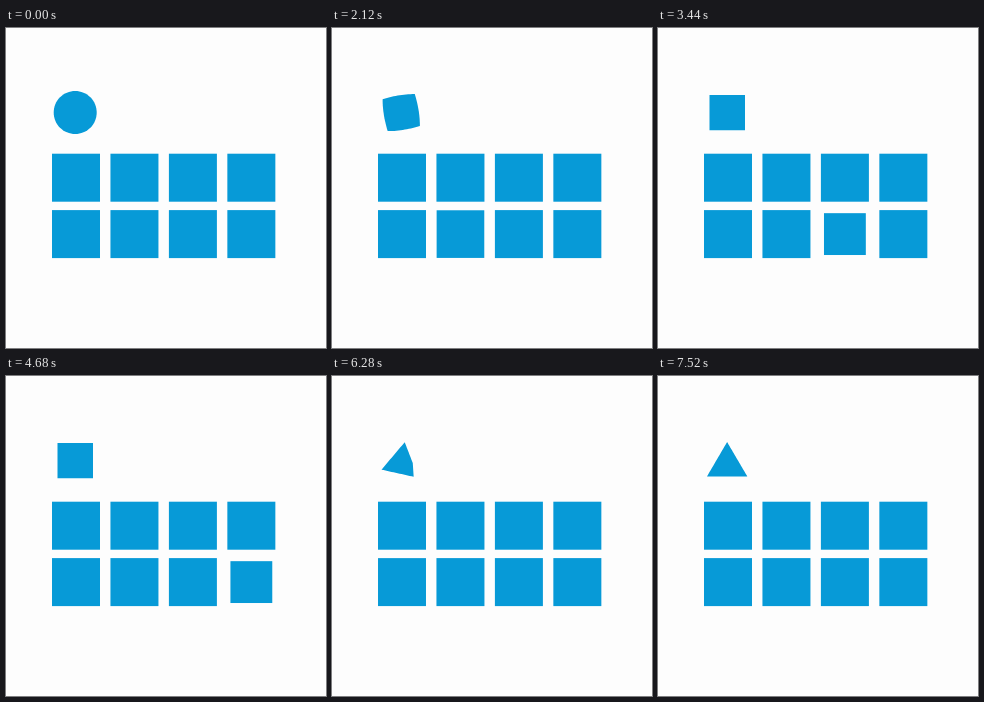
Recreate the animation shown at these times as an HTML page with a canvas. Size 320x320 px, loop 8000 ms.

```html
<!DOCTYPE html>
<html lang="en">
<head>
<meta charset="utf-8">
<title>Shape and tiles</title>
<style>
html, body { margin: 0; width: 100%; height: 100%; overflow: hidden; background: #fdfdfd; }
canvas { display: block; width: 100vmin; height: 100vmin; }
</style>
</head>
<body>
<canvas id="stage"></canvas>
<script>
const SIZE = 320, LOOP = 8000, STEP = 40;
const BLUE = '#079ad7', PAPER = '#fdfdfd';
const TILE = 48, PITCH_X = 58.45, PITCH_Y = 56.4, LEFT = 46, TOP = 125.7;
const PULSE = 600, MORPH = 2500, DIP = 0.145;
const SIDE_STEPS = 16;

// Tile presses: [start, column, row]
const presses = [
  [900, 0, 0], [2100, 1, 1], [3260, 2, 1],
  [4500, 3, 1], [5710, 0, 1], [6930, 1, 0]
];

const canvas = document.getElementById('stage');
const ctx = canvas.getContext('2d');

const clamp = v => Math.min(1, Math.max(0, v));
const mix = (a, b, t) => a + (b - a) * t;

// cubic-bezier(.25, .1, .25, 1)
function ease(x) {
  if (x <= 0 || x >= 1) return clamp(x);
  let lo = 0, hi = 1, s;
  for (let i = 0; i < 24; i++) {
    s = (lo + hi) / 2;
    if (0.75 * s * (1 - s) + s * s * s < x) lo = s; else hi = s;
  }
  const r = 1 - s;
  return 0.3 * r * r * s + 3 * r * s * s + s * s * s;
}

// Outlines share one point order so they can be blended point by point.
function polygon(corners) {
  const points = [];
  corners.forEach((a, i) => {
    const b = corners[(i + 1) % corners.length];
    for (let k = 0; k < SIDE_STEPS; k++) {
      points.push([mix(a[0], b[0], k / SIDE_STEPS), mix(a[1], b[1], k / SIDE_STEPS)]);
    }
  });
  return points;
}

function ring(cx, cy, r) {
  const count = SIDE_STEPS * 4;
  return Array.from({ length: count }, (_, i) => {
    const a = Math.PI + i / count * 2 * Math.PI;
    return [cx + r * Math.cos(a), cy + r * Math.sin(a)];
  });
}

const circle = ring(69.2, 84.5, 21.5);
const square = polygon([[51.5, 67], [87, 67], [87, 102.2], [51.5, 102.2]]);
const triangle = polygon([[49, 100.4], [69.1, 66], [79.2, 83.2], [89.3, 100.4]]);

const morphs = [[960, circle, square], [5040, square, triangle]];

function drawShape(time) {
  const [start, from, to] = morphs[time < morphs[1][0] ? 0 : 1];
  const t = ease((time - start) / MORPH);
  ctx.beginPath();
  from.forEach((p, i) => ctx.lineTo(mix(p[0], to[i][0], t), mix(p[1], to[i][1], t)));
  ctx.closePath();
  ctx.fill();
}

function tileScale(time, col, row) {
  const press = presses.find(([start, c, r]) =>
    c === col && r === row && time >= start && time < start + PULSE);
  if (!press) return 1;
  const u = (time - press[0]) / PULSE * 2;
  return 1 - DIP * (u < 1 ? ease(u) : 1 - ease(u - 1));
}

function drawTiles(time) {
  for (let row = 0; row < 2; row++) {
    for (let col = 0; col < 4; col++) {
      const side = TILE * tileScale(time, col, row);
      const inset = (TILE - side) / 2;
      ctx.fillRect(LEFT + col * PITCH_X + inset, TOP + row * PITCH_Y + inset, side, side);
    }
  }
}

function resize() {
  const px = Math.round(Math.min(innerWidth, innerHeight) * devicePixelRatio) || SIZE;
  if (canvas.width !== px) canvas.width = canvas.height = px;
  ctx.setTransform(px / SIZE, 0, 0, px / SIZE, 0, 0);
}

const begin = performance.now();

function frame() {
  const elapsed = (performance.now() - begin) % LOOP;
  const time = Math.floor(elapsed / STEP) * STEP;
  resize();
  ctx.fillStyle = PAPER;
  ctx.fillRect(0, 0, SIZE, SIZE);
  ctx.fillStyle = BLUE;
  drawShape(time);
  drawTiles(time);
  requestAnimationFrame(frame);
}

frame();
</script>
</body>
</html>
```
